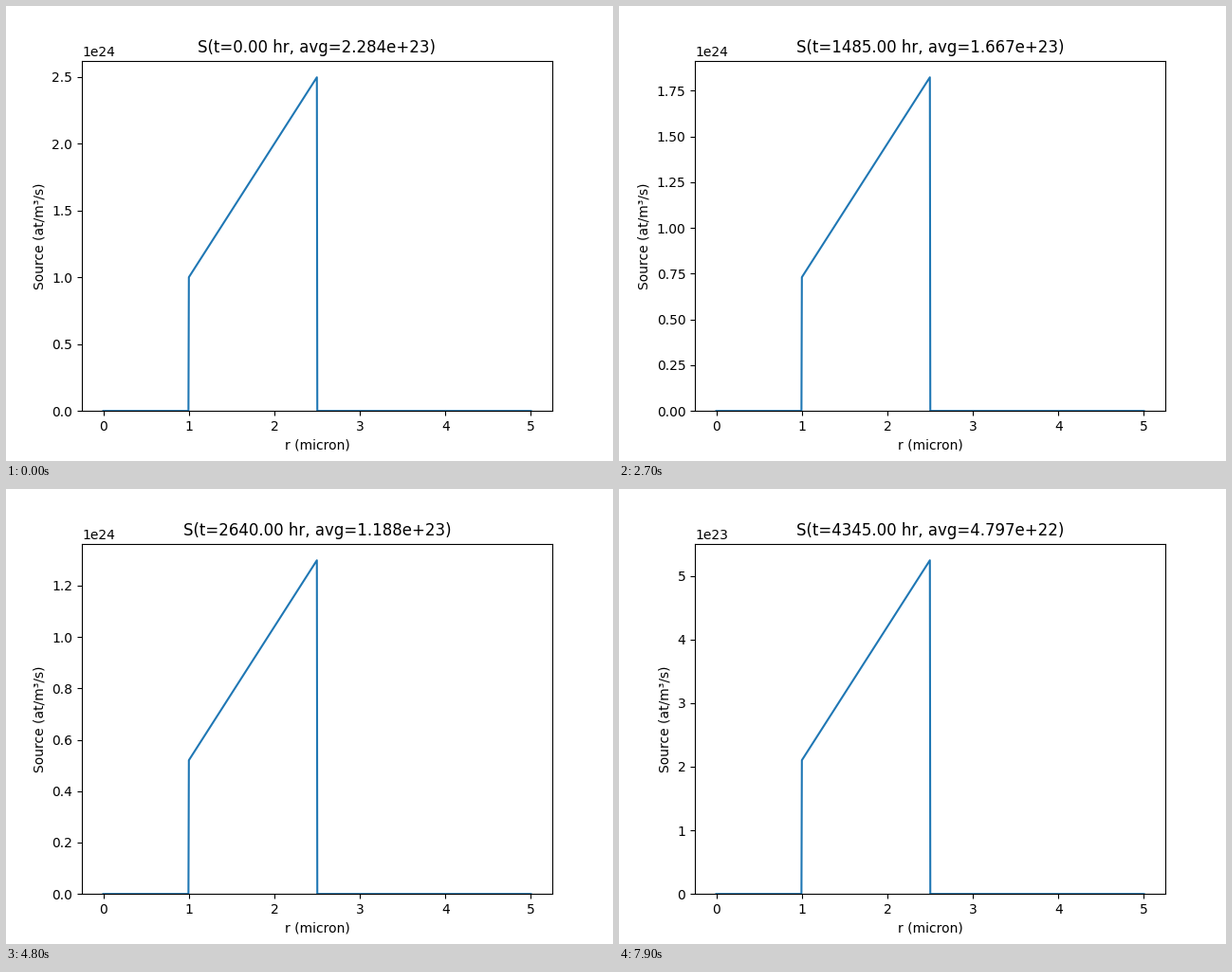
Animation of 640x480 px, one loop 8000 ms. Source, as a matplotlib script:

```python
import numpy as np
import matplotlib.pyplot as plt
from matplotlib.animation import FuncAnimation

FRAMES = 80
INTERVAL = 100      # ms
STEP = 55.0         # hours per frame
T_END = 5500.0      # hours until the rate reaches zero
R_MAX = 5.0         # micron

r = np.linspace(0, R_MAX, 1000)
profile = np.where((r >= 1) & (r <= 2.5), r * 1e24, 0.0)


def sphere_average(s):
    """Volume average over the sphere; s vanishes at both ends."""
    return 3 * np.sum(s * r**2) * (r[1] - r[0]) / R_MAX**3


fig, ax = plt.subplots(figsize=(6.4, 4.8), dpi=100)
line, = ax.plot(r, profile)
ax.set_xlabel("r (micron)")
ax.set_ylabel("Source (at/m³/s)")


def update(i):
    t = i * STEP
    s = profile * (1 - t / T_END)
    line.set_ydata(s)
    ax.set_ylim(0, 1.05 * s.max())
    ax.set_title(f"S(t={t:.2f} hr, avg={sphere_average(s):.3e})")
    return line,


anim = FuncAnimation(fig, update, frames=FRAMES, interval=INTERVAL,
                     repeat=True, repeat_delay=0, blit=False)
plt.show()
```
